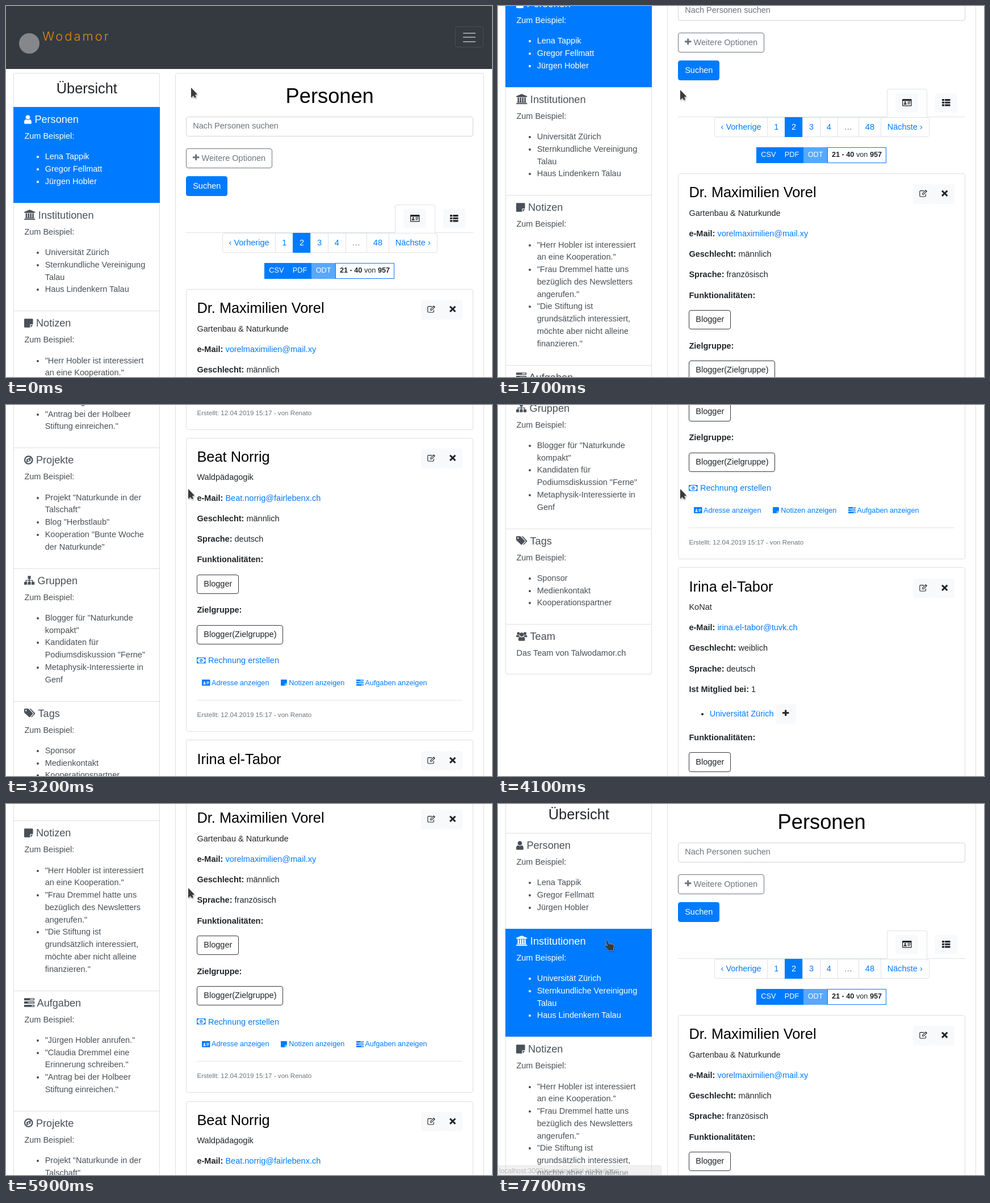
An HTML page for the animation above (8 s loop, 856 by 654 pixels).

```html
<!DOCTYPE html>
<html lang="de">
<head>
<meta charset="utf-8">
<title>Personen</title>
<style>
* { box-sizing: border-box; }
html { font-size: 14.5px; }
html, body { margin: 0; width: 100%; height: 100%; overflow: hidden; background: #fff; }
body { position: relative; font: 1rem/1.5 "Liberation Sans", Arial, sans-serif; color: #212529; white-space: nowrap; }
h1, h3, h5 { margin: 0; font-weight: 400; line-height: 1.2; }
p, ul { margin: 0 0 1rem; }
ul { padding-left: 2.5rem; }
a, .link { color: #007bff; }
svg { overflow: visible; fill: currentColor; fill-rule: evenodd; }
.icon { height: 1em; vertical-align: -.143em; }
#page { position: absolute; left: 0; top: 0; width: 856px; height: 2700px; }
header { position: absolute; width: 856px; height: 110.5px; background: #343a40; }
.mark { position: absolute; left: 23px; top: 48px; width: 36px; height: 36px; border-radius: 50%; background: #85878a; }
.brand { position: absolute; left: 64px; top: 37px; font: 300 22px/33px Inter, sans-serif; letter-spacing: 3px; color: #e8890c; }
.toggler { position: absolute; left: 791px; top: 36px; width: 50px; height: 37px; border: 1px solid #484e53; border-radius: 4px; }
.toggler i { display: block; width: 22px; height: 2px; margin: 9.5px 0 -4px 13px; background: #999c9f; }

#side { position: absolute; left: 13.3px; top: 117.75px; width: 258px; }
.item { border: solid #dfdfdf; border-width: 1px 1px 0; padding: .75rem 1.25rem 11.875px; color: #495057; }
.item h5 { font-size: 1.25rem; margin-bottom: .5rem; }
.item.title { height: 60.45px; text-align: center; color: #212529; border-radius: 4px 4px 0 0; }
.item:last-child { border-bottom-width: 1px; padding-bottom: .75rem; border-radius: 0 0 4px 4px; }
.item.hover { background: #f8f9fa; }
.item.active { background: #007bff; border-color: #007bff; color: #fff; }
h3 { font-size: 1.75rem; }

#main, .card { border: 1px solid #dfdfdf; border-radius: 4px; padding: 1.25rem; }
#main { position: absolute; left: 298.2px; top: 117.75px; width: 544px; height: 2580px; }
h1 { font-size: 2.5rem; text-align: center; color: #000; margin-bottom: 1rem; }
.search { height: 34.625px; border: 1px solid #ced4da; border-radius: 4px; padding: .375rem .75rem; color: #6c757d; margin-bottom: 1.5rem; }
.btn { display: block; width: fit-content; padding: .375rem .75rem; border: 1px solid; border-radius: 4px; color: #212529; }
.gray { color: #6c757d; margin-bottom: 1rem; }
.blue { background: #007bff; border-color: #007bff; color: #fff; }
.light { background: #f8f9fa; border-color: #f8f9fa; }
.tabs { display: flex; justify-content: flex-end; height: 50.5px; margin-top: 1rem; border-bottom: 1px solid #dee2e6; }
.tab { height: 50.5px; padding: 8.25px 1rem 0; }
.tab.on { border: 1px solid #dee2e6; border-bottom-color: #fff; border-radius: 4px 4px 0 0; padding-top: .5rem; background: #fff; }
.pages, .group { display: flex; justify-content: center; margin-bottom: 1.25rem; }
.pages span { border: 1px solid #dee2e6; margin-left: -1px; padding: .5rem .75rem; line-height: 1.25; color: #007bff; }
.pages .blue { color: #fff; border-color: #007bff; }
.pages .off { color: #6c757d; }
.pages :first-child, .group :first-child { border-radius: 4px 0 0 4px; margin-left: 0; }
.pages :last-child, .group > :last-child { border-radius: 0 4px 4px 0; }
.small { font-size: .875rem; padding: .25rem .5rem; }
.group .btn { margin-left: -1px; border-radius: 0; }

.card { position: relative; margin-bottom: 1rem; }
.card h3 { color: #000; margin: -1px 0 10.9px; }
.tools { position: absolute; right: 1.25rem; top: 1.25rem; display: flex; }
.card .dark { border-color: #343a40; margin-bottom: 1.25rem; }
.row { display: flex; gap: 4px; margin-bottom: 1rem; }
.row .btn { border-color: transparent; color: #007bff; }
.rule { height: 1px; background: #e3e3e3; margin-bottom: 1rem; }
.note { font-size: 80%; line-height: 1.5rem; color: #6c757d; }
.card li { height: 34.625px; line-height: 34.625px; }
.card li .btn { display: inline-block; line-height: 1.5; vertical-align: middle; margin-top: -1px; }

#status { position: absolute; left: 0; bottom: 0; width: 288px; height: 17px; border: solid #ccc; border-width: 1px 1px 0 0; border-radius: 0 4px 0 0; background: #e4e4e4; font-size: 12px; line-height: 18px; padding-left: 2px; color: #777; }
#cursor { position: absolute; width: 20px; height: 20px; filter: drop-shadow(1px 2px 1px #0004); fill: #3a3a3a; stroke: #eee; stroke-width: .8; paint-order: stroke; }
</style>
</head>
<body>
<div id="page">
  <header>
    <div class="mark"></div><div class="brand">Wodamor</div>
    <div class="toggler"><i></i><i></i><i></i></div>
  </header>
  <div id="side"></div>
  <div id="main"></div>
</div>
<div id="status">localhost:3000/overview#list-institutions</div>
<svg id="cursor" viewBox="0 0 20 20"><path/></svg>
<script>
const $ = id => document.getElementById(id);

// Icons on a 14-unit grid: [width, filled path, stroked path]
const person = 'M5 4.8a1.4 1.4 0 1 0 .01 0zM2.5 10.5q0-2.5 1.3-2.6h2.4q1.3.1 1.3 2.6z';
const cardLines = 'M9 5h5v1H9zM9 7h5v1H9zM9 9h4v1H9z';
const frame = 'M1 1h14q1 0 1 1v10q0 1-1 1H1q-1 0-1-1V2q0-1 1-1z';
const icons = {
  user: [10, 'M5 1a3 3 0 1 0 .01 0zM0 11.5C0 8 1.2 6.9 2.5 6.7Q5 8.6 7.5 6.7C8.8 6.9 10 8 10 11.5Q10 13 8.5 13h-7Q0 13 0 11.5z'],
  bank: [15, 'M7.5 0L15 3v1h-1v.5H1V4H0V3zM2 5h2v6h1V5h2v6h1V5h2v6h1V5h2v6h.5l.5.5v.5H1v-.5l.5-.5H2zM0 14v-1l.5-.5h14l.5.5v1z'],
  sticky: [12, 'M8 9.5V13H1Q0 13 0 12V2Q0 1 1 1h10Q12 1 12 2v6.5H9Q8 8.5 8 9.5zM9 9.5h3L9 12.9z'],
  tasks: [14, 'M0 1h14v3H0zM8 2h5v1H8zM0 5.5h14v3H0zM5 6.5h8v1H5zM0 10h14v3H0zM10 11h3v1h-3z'],
  compass: [12, 'M6 1a6 6 0 1 0 .01 0zM6 2.7a4.3 4.3 0 1 1-.01 0zM8.8 3.5V8L3.2 10.5V6zM5 6.8l2-1v2l-2 1z'],
  sitemap: [14, 'M5 1h4v4H7.6v1.5H12V9h2v4h-4V9h1V7.5H7.6V9H9v4H5V9h1.4V7.5H3V9h1v4H0V9h2V6.5h4.4V5H5z'],
  tags: [15, 'M0 2Q0 1 1 1h4q.6 0 1 .4l5.6 5.6q.6.7 0 1.4l-3.7 4q-.7.6-1.4 0l-6-5.7Q0 6.2 0 5.5zM2.5 2.5a1 1 0 1 0 .01 0zM7.2 1h1q.6 0 1 .4l5.4 5.6q.6.7 0 1.4l-3.9 4q-.8.6-1.4-.2l3.2-3.3q1-1.1 0-2.1z'],
  users: [15, 'M3 1a2 2 0 1 0 .01 0zM12 1a2 2 0 1 0 .01 0zM7.5 1.5a2.8 2.8 0 1 0 .01 0zM3 11.5C3 8.5 4 7.6 5 7.4Q7.5 9 10 7.4C11 7.6 12 8.5 12 11.5Q12 13 10.5 13h-6Q3 13 3 11.5zM0 7Q0 5 1 5q2 .8 3.2.3Q4.2 6.5 4.8 7L2.6 8H1Q0 8 0 7zM15 7q0-2-1-2-2 .8-3.2.3 0 1.2-.6 1.7l2.2 1H14q1 0 1-1z'],
  plus: [11, 'M4 1.5h3V5h4v3H7v3.5H4V8H0V5h4z'],
  idCard: [16, frame + 'M1.2 4v7.8h13.6V4z' + person + cardLines],
  address: [16, frame + person + cardLines],
  list: [14, 'M0 1h4v3H0zM5 1h9v3H5zM0 5.5h4v3H0zM5 5.5h9v3H5zM0 10h4v3H0zM5 10h9v3H5z'],
  edit: [14, 'M5 9.5V7l6-6 2.5 2.5-6 6zM6 7.5v1h1l4.6-4.6-1-1z', 'M11 8.5V11q0 1.5-1.5 1.5H2.3Q.8 12.5.8 11V4Q.8 2.5 2.3 2.5H8'],
  times: [11, 'M2 1.5L5.5 5 9 1.5l2 2L7.5 7l3.5 3.5-2 2L5.5 9 2 12.5l-2-2L3.5 7 0 3.5z'],
  money: [15, 'M0 2h15v10H0zM3 3q0 2-2 2v4q2 0 2 2h9q0-2 2-2V5q-2 0-2-2zM7.5 4a2.4 3 0 1 0 .01 0zM6.5 5.3h1.4v2.5h.6v.8h-2v-.8h.5V6.3h-.5z']
};
const icon = name => {
  const [w, fill, line] = icons[name];
  return `<svg class="icon" style="width:${w / 14}em" viewBox="0 0 ${w} 14"><path d="${fill}"/>` +
    (line ? `<path d="${line}" fill="none" stroke="currentColor" stroke-width="1.1"/>` : '') + '</svg>';
};
const bullets = rows => `<ul>${rows.map(r => `<li>${r.replace(/\|/g, '<br>')}</li>`).join('')}</ul>`;

// Sidebar
const sections = [
  ['user', 'Personen', 'Lena Tappik', 'Gregor Fellmatt', 'Jürgen Hobler'],
  ['bank', 'Institutionen', 'Universität Zürich', 'Sternkundliche Vereinigung|Talau', 'Haus Lindenkern Talau'],
  ['sticky', 'Notizen', '"Herr Hobler ist interessiert|an eine Kooperation."',
    '"Frau Dremmel hatte uns|bezüglich des Newsletters|angerufen."',
    '"Die Stiftung ist|grundsätzlich interessiert,|möchte aber nicht alleine|finanzieren."'],
  ['tasks', 'Aufgaben', '"Jürgen Hobler anrufen."', '"Claudia Dremmel eine|Erinnerung schreiben."',
    '"Antrag bei der Holbeer|Stiftung einreichen."'],
  ['compass', 'Projekte', 'Projekt "Naturkunde in der|Talschaft"', 'Blog "Herbstlaub"',
    'Kooperation "Bunte Woche|der Naturkunde"'],
  ['sitemap', 'Gruppen', 'Blogger für "Naturkunde|kompakt"', 'Kandidaten für|Podiumsdiskussion "Ferne"',
    'Metaphysik-Interessierte in|Genf'],
  ['tags', 'Tags', 'Sponsor', 'Medienkontakt', 'Kooperationspartner'],
  ['users', 'Team']
];
$('side').innerHTML = '<div class="item title"><h3>Übersicht</h3></div>' + sections.map(([ic, name, ...rows]) =>
  `<div class="item"><h5>${icon(ic)} ${name}</h5>` +
  (rows.length ? '<p>Zum Beispiel:</p>' + bullets(rows) : '<p>Das Team von Talwodamor.ch</p>') + '</div>').join('');

// Main column
const field = (label, value = '') => `<p><b>${label}:</b> ${value}</p>`;
const tag = text => `<div class="btn dark">${text}</div>`;
const action = (ic, text) => `<span class="btn small">${icon(ic)} ${text}</span>`;
const card = (name, about, mail, sex, language, member) => `<div class="card">
  <h3>${name}</h3>
  <div class="tools"><span class="btn light">${icon('edit')}</span><span class="btn light">${icon('times')}</span></div>
  <p>${about}</p>
  ${field('e-Mail', `<a>${mail}</a>`)}${field('Geschlecht', sex)}${field('Sprache', language)}
  ${member ? field('Ist Mitglied bei', 1) + bullets([`<a>${member}</a> <span class="btn light">${icon('plus')}</span>`]) : ''}
  ${field('Funktionalitäten')}${tag('Blogger')}
  ${field('Zielgruppe')}${tag('Blogger(Zielgruppe)')}
  <p class="link">${icon('money')} Rechnung erstellen</p>
  <div class="row">${action('address', 'Adresse anzeigen')}${action('sticky', 'Notizen anzeigen')}${action('tasks', 'Aufgaben anzeigen')}</div>
  <div class="rule"></div>
  <div class="note">Erstellt: 12.04.2019 15:17 - von Renato</div>
</div>`;
const pageLink = text => `<span class="${text == 2 ? 'blue' : text == '…' ? 'off' : ''}">${text}</span>`;

$('main').innerHTML = `<h1>Personen</h1>
  <div class="search">Nach Personen suchen</div>
  <div class="btn gray">${icon('plus')} Weitere Optionen</div>
  <div class="btn blue">Suchen</div>
  <div class="tabs"><div class="tab on"><span class="btn light">${icon('idCard')}</span></div>
    <div class="tab"><span class="btn light">${icon('list')}</span></div></div>
  <div class="pages">${['‹ Vorherige', 1, 2, 3, 4, '…', 48, 'Nächste ›'].map(pageLink).join('')}</div>
  <div class="group"><span class="btn small blue">CSV</span><span class="btn small blue">PDF</span>
    <span class="btn small blue" style="opacity:.65">ODT</span>
    <span class="btn small" style="border-color:#007bff"><b>21 - 40</b> von <b>957</b></span></div>` +
  card('Dr. Maximilien Vorel', 'Gartenbau &amp; Naturkunde', 'vorelmaximilien@mail.xy', 'männlich', 'französisch') +
  card('Beat Norrig', 'Waldpädagogik', 'Beat.norrig@fairlebenx.ch', 'männlich', 'deutsch') +
  card('Irina el-Tabor', 'KoNat', 'irina.el-tabor@tuvk.ch', 'weiblich', 'deutsch', 'Universität Zürich');

// Motion: [time, value...] keys, sampled ten times a second
const scrollKeys = [[0, 0], [1100, 0], [1700, 204], [1800, 204], [2200, 880], [3100, 880], [3200, 973.5],
  [3700, 1322], [4000, 1322], [4100, 1277.5], [4200, 1230], [4300, 1230], [4500, 1090], [4600, 1090],
  [4700, 1016], [4900, 900], [5200, 900], [5400, 770], [5500, 770], [5600, 690], [5700, 690],
  [5900, 508], [6100, 508], [6200, 320], [6300, 320], [6400, 130], [7600, 130], [7700, 127]];
const cursorKeys = [[0, 326, 144], [500, 326, 144], [800, 321, 148], [6600, 321, 148], [7100, 188, 241],
  [7200, 188, 241], [7500, 189, 226], [7600, 189, 226], [7700, 188, 240]];
const statusKeys = [[0, 0], [7200, 0], [7500, 1], [7600, 1], [7700, .5]];
const arrow = 'M0 0V17.5L4 14 6.5 18 8.8 16.8 7 12.5 11 11.5z';
const hand = 'M2 1.5Q3.5-.3 5 1.5L7.5 7 14 7.5Q16.5 8 16.5 10L15 15V18H7.5L.8 11Q-.2 9 2 9L5 10.3z';

function at(keys, t) {
  const i = keys.findIndex(k => k[0] > t);
  if (i < 0) return keys.at(-1).slice(1);
  const [t0, ...a] = keys[i - 1], [t1, ...b] = keys[i];
  return a.map((v, j) => v + (b[j] - v) * (t - t0) / (t1 - t0));
}

const items = document.querySelectorAll('.item');
const start = performance.now();
function draw(now) {
  const t = Math.floor(Math.max(0, now - start) % 8000 / 100) * 100;
  const [x, y] = at(cursorKeys, t), clicked = t >= 7700, over = t >= 7300;
  $('page').style.top = -at(scrollKeys, t)[0] + 'px';
  $('cursor').style.left = x + 'px';
  $('cursor').style.top = y + 'px';
  $('cursor').firstChild.setAttribute('d', over ? hand : arrow);
  $('status').style.opacity = at(statusKeys, t)[0];
  items[1].classList.toggle('active', !clicked);
  items[2].classList.toggle('active', clicked);
  items[2].classList.toggle('hover', over && !clicked);
  requestAnimationFrame(draw);
}
draw(start);
</script>
</body>
</html>
```
